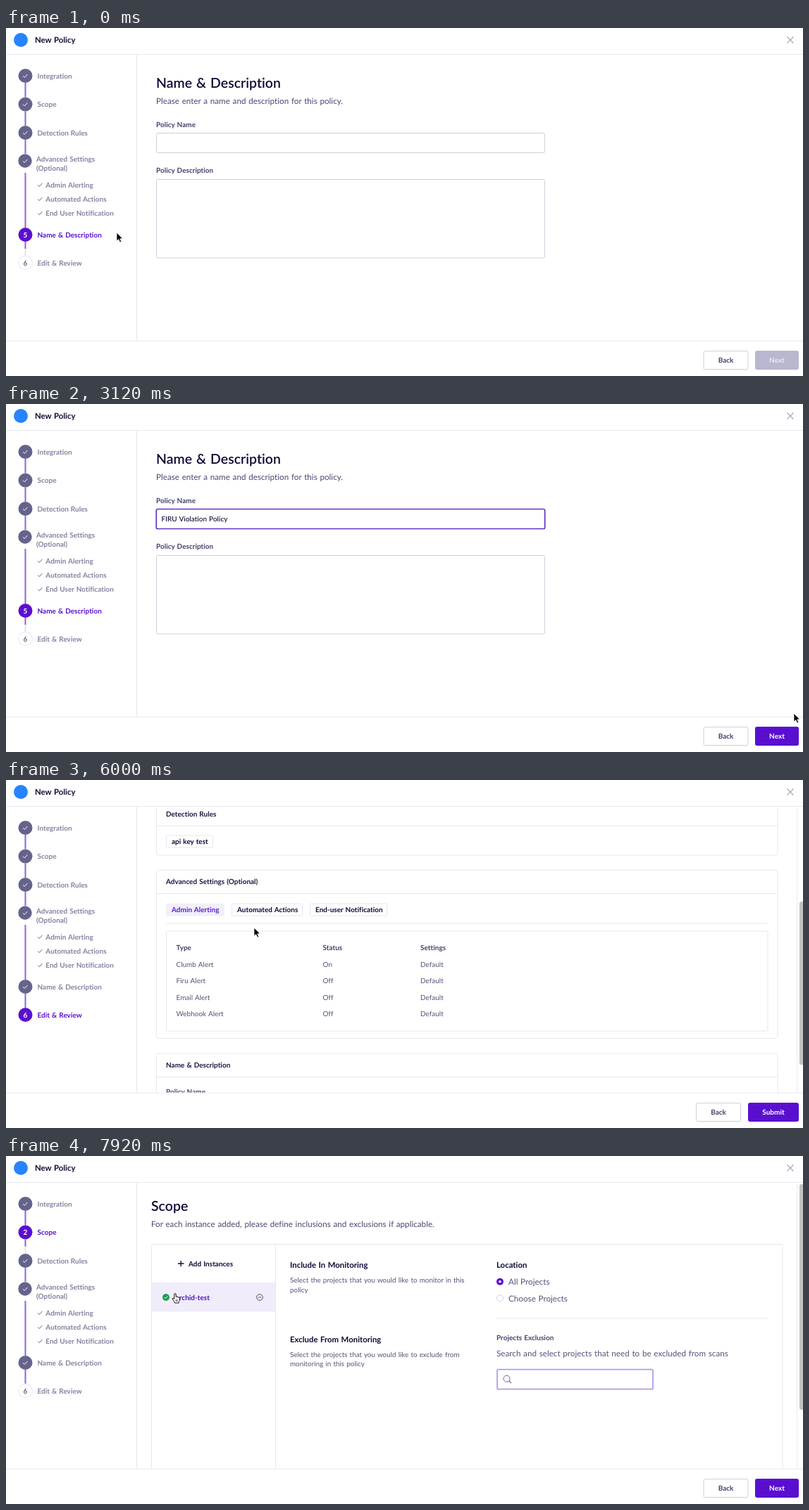
These frames come from a looping animation (1131 px wide and 495 px high, 8000 ms). An HTML page:

```html
<!DOCTYPE html>
<html lang="en">
<head>
<meta charset="utf-8">
<title>New Policy</title>
<style>
html, body { margin: 0; width: 100%; height: 100%; overflow: hidden; background: #fff; }
svg { display: block; }
text {
  font-family: Lato, "Open Sans", sans-serif; font-variant-ligatures: none;
  word-spacing: .06em; white-space: pre; text-rendering: geometricPrecision;
}
</style>
</head>
<body>
<svg id="stage" width="1131" height="495" viewBox="0 0 1131 495"></svg>
<script>
const LOOP = 8000, STEP = 80;
const INK = '#100b35', LABEL = '#45426b', BODY = '#56537a', MUTED = '#85829f';
const PURPLE = '#5a0fd0', DONE = '#65638b', RULE = '#e7e6ef', EDGE = '#cfcedb';
const NAME = 'FIRU Violation Policy', SITE = 'orchid-test';

// Drawing helpers; text y is the middle of the capitals.
const text = (x, y, s, fill = INK, size = 10, weight = 700, anchor = 'start', id = '') =>
  `<text ${id && `id="${id}"`} x="${x}" y="${y + size * .36}" fill="${fill}" font-size="${size}" font-weight="${weight}" text-anchor="${anchor}">${s.replace('&', '&amp;')}</text>`;
const plain = (x, y, s, size = 10, fill = BODY) => text(x, y, s, fill, size, 400);
const rect = (x, y, x2, y2, stroke = RULE, fill = 'none', width = 1, rx = 2) =>
  `<rect x="${x}" y="${y}" width="${x2 - x}" height="${y2 - y}" rx="${rx}" fill="${fill}" stroke="${stroke}" stroke-width="${width}"/>`;
const path = (d, stroke = RULE, width = 1, fill = 'none') =>
  `<path d="${d}" fill="${fill}" stroke="${stroke}" stroke-width="${width}"/>`;
const dot = (x, y, r, fill, stroke = 'none') =>
  `<circle cx="${x}" cy="${y}" r="${r}" fill="${fill}" stroke="${stroke}"/>`;
const group = (id, body) => `<g id="${id}">${body}</g>`;
const tick = (x, y, color, s = 1) =>
  path(`M${x - 3.2 * s} ${y + .2 * s}l${2.2 * s} ${2.2 * s}l${4.2 * s} ${-4.6 * s}`, color, 1);

const heading = (x, y, title, note) =>
  text(x, y, title, INK, 19.5, 600) + plain(x, y + 26, note, 11.7, '#4b4870');

const button = (x, x2, label, fill, color, stroke = fill) =>
  rect(x + .5, 459.5, x2 - .5, 485.5, stroke, fill) + text((x + x2) / 2, 472, label, color, 10, 700, 'middle');
const back = x => button(x, x + 64, 'Back', '#fff', LABEL, EDGE);

function sidebar(active, doneCount) {
  const steps = [[68, 'Integration'], [108.5, 'Scope'], [149, 'Detection Rules'], [189, ''],
    [294, 'Name & Description'], [334, 'Edit & Review']];
  let out = '';
  steps.forEach(([y, label], i) => {
    const n = i + 1, on = n === active, done = !on && n <= doneCount;
    if (n < 6) {
      const top = n === 4 ? 206 : y + 10, end = steps[i + 1][0] - 10;
      out += path(`M27.5 ${top}V${end}`, '#e6e4ee', 2);
      out += path(`M27.5 ${top}V${on ? (top + end) / 2 : end}`, '#9468da', 2);
    }
    out += dot(n === 4 ? 27 : 27.5, y, n === 4 ? 9.7 : 10, on ? PURPLE : done ? DONE : '#fff', on || done ? 'none' : RULE);
    out += done ? tick(27.3, y, '#fff')
      : text(27.5, y, String(n), on ? '#fff' : DONE, 10, 700, 'middle');
    out += text(44.5, y, label, on ? PURPLE : MUTED);
  });
  out += text(43, 186, 'Advanced Settings', MUTED) + text(43, 199.5, '(Optional)', MUTED);
  ['Admin Alerting', 'Automated Actions', 'End User Notification'].forEach((s, i) => {
    const y = 223 + i * 20.2;
    out += tick(48.3, y, DONE) + text(56.3, y, s, MUTED);
  });
  return out;
}

const card = (y, y2, title) => rect(213.5, y, 1095, y2, RULE, '#fff', 1, 3) +
  path(`M213.5 ${y + 33.5}H1095`) + text(227, y + 16.5, title, '#1b1642');
const tag = (x, x2, y, s, on) =>
  rect(x + .5, y - 8.5, x2 - .5, y + 8.5, on ? '#f1eff8' : RULE, on ? '#f1eff8' : '#fff', 1, 1) +
  text(x + 8, y, s, on ? '#5a1fd0' : INK);
const scrollbar = (len, id) => path('M1122.5 38V445', '#ececf0') +
  `<rect id="${id}" x="1126" y="40" width="8" height="${len}" rx="3" fill="#c1c1c1"/>`;
const view = body =>
  `<svg x="0" y="38.5" width="1131" height="406" viewBox="0 38.5 1131 406">${body}</svg>`;

function formPage() {
  return sidebar(5, 4) +
    heading(213, 78, 'Name & Description', 'Please enter a name and description for this policy.') +
    text(213, 137, 'Policy Name', LABEL) + rect(213.5, 149.5, 764.5, 177.5, EDGE) +
    group('focus', rect(213.3, 149.5, 764.7, 177.5, '#6530c4', 'none', 1.7)) +
    text(220.5, 163.5, '', INK, 10, 500, 'start', 'typed') +
    `<path id="caret" d="M0 157V170" stroke="#111"/>` +
    text(213, 202.5, 'Policy Description', LABEL) + rect(213.5, 215.5, 764.5, 327, EDGE) +
    back(989.5) + button(1063, 1125, 'Next', '#b9b6cf', '#ebeaf3') +
    group('ready', button(1063, 1125, 'Next', PURPLE, '#fff'));
}

function reviewPage() {
  const cols = [227, 442.5, 586], cells = [241.5, 449.5, 588];
  const row = (xs, y, items, bold) => items.map((s, i) =>
    bold ? text(xs[i], y, s, LABEL) : plain(xs[i], y, s)).join('');
  const body =
    heading(213, 78, 'Edit & Review', 'Please edit and review all policy settings before continuing.') +
    card(132.5, 237.5, 'Scope') +
    row(cols, 190, ['Site', 'Project Inclusions', 'Project Exclusion'], true) +
    row(cols, 213.5, [SITE, 'All Projects', 'N/A']) +
    card(259, 334.5, 'Detection Rules') + tag(227, 294, 315, 'api key test') +
    card(355.5, 595, 'Advanced Settings (Optional)') +
    tag(227, 310, 412, 'Admin Alerting', true) + tag(320, 421, 412, 'Automated Actions') +
    tag(431, 541, 412, 'End-user Notification') +
    path('M227 431.5H1081') + rect(227.5, 442.5, 1081, 584.5) +
    row(cells, 466, ['Type', 'Status', 'Settings'], true) +
    ['Clumb', 'Firu', 'Email', 'Webhook'].map((s, i) =>
      row(cells, 489.5 + i * 23.6, [s + ' Alert', i ? 'Off' : 'On', 'Default'])).join('') +
    card(616.5, 722, 'Name & Description') +
    text(227, 670.5, 'Policy Name', LABEL) + plain(227, 694, NAME);
  return sidebar(6, 5) + view(group('scroll', body)) + scrollbar(232, 'thumb') +
    back(979) + button(1053, 1125, 'Submit', PURPLE, '#fff');
}

function scopePage() {
  const about = (y, title, a, b) => text(403, y, title, INK, 11.4) +
    plain(403, y + 21.5, a, 9.9) + plain(403, y + 35, b, 9.9);
  const body =
    heading(206, 71, 'Scope', 'For each instance added, please define inclusions and exclusions if applicable.') +
    rect(206.5, 125.5, 1102, 470) + path('M382.5 126V445') +
    path('M244 153H252.5M248.2 148.8V157.2', INK, 1.3) + text(259, 153, 'Add Instances') +
    '<rect x="207" y="180" width="175" height="41.5" fill="#f0ecfa"/>' +
    dot(227, 201, 5, '#1fa04a') + tick(227, 201, '#fff', .7) + text(240, 201, SITE, '#4c16b8') +
    dot(360, 201, 4.3, 'none', '#4a4770') + path('M358 201H362', '#4a4770') +
    about(155, 'Include In Monitoring', 'Select the projects that you would like to monitor in this', 'policy') +
    about(260.5, 'Exclude From Monitoring', 'Select the projects that you would like to exclude from', 'monitoring in this policy') +
    text(696, 155, 'Location', INK, 11.4) +
    dot(701, 178.7, 5, PURPLE) + dot(701, 178.7, 1.8, '#fff') + plain(713, 178.7, 'All Projects', 11.7) +
    dot(701, 202.3, 4.6, '#fff', EDGE) + plain(713, 202.3, 'Choose Projects', 11.7) +
    path('M696 231H1081') + text(696, 258, 'Projects Exclusion', LABEL) +
    plain(696, 280.5, 'Search and select projects that need to be excluded from scans', 11.7) +
    rect(697, 303.7, 918, 331.7, '#b497ea', '#fff', 1.7) +
    dot(710.5, 316.7, 4.5, 'none', DONE) + path('M713.8 320L717 323', DONE, 1.2);
  return sidebar(2, 5) + view(body) + scrollbar(321, 'thumb2') +
    back(989.5) + button(1063, 1125, 'Next', PURPLE, '#fff');
}

const cursors =
  group('arrow', path('M0 0V12L2.8 9.5L4.7 13.8L6.7 12.9L4.9 8.7H8.6Z', '#fff', .8, '#000')) +
  group('beam', path('M-3 -6Q0 -6 0 -4.5V4.5Q0 6 -3 6M3 -6Q0 -6 0 -4.5V4.5Q0 6 3 6M-1.6 1.5H1.6', '#111', 1.3)) +
  group('hand', path('M-1.2 6V1Q-1.2 -.4 0 -.4T1.2 1V4.2Q2.3 3.5 3 4.6Q4.2 4 4.8 5.2Q6.6 4.8 6.6 6.8Q6.6 10 5.2 11.5V13H-.4Q-1 10.8 -3.6 8Q-4.4 6.6 -3.2 6.2Q-2.2 6 -1.2 7.5Z', '#111', 1, '#fff') +
    path('M1.3 8V11M3 8V11', '#111', .7));

document.getElementById('stage').innerHTML =
  dot(21, 17, 10, '#2684ff') + text(41, 17, 'New Policy', INK, 11.4) +
  path('M1108.5 12.5L1117.5 21.5M1117.5 12.5L1108.5 21.5', '#a9a8bd', 1.3) +
  path('M0 37.5H1131M185.5 38V445M0 445H1131') +
  group('page0', formPage()) + group('page1', reviewPage()) + group('page2', scopePage()) +
  group('cursor', cursors);

const CURSOR = [[0, 157, 291], [320, 290, 304], [560, 371, 296], [720, 340, 262], [880, 255, 215],
  [1120, 243.5, 160], [2720, 243.5, 160], [2960, 740, 310], [3120, 1118, 440], [3360, 1096, 470],
  [3760, 1096, 470], [4080, 640, 290], [4400, 185, 79], [4720, 215, 140], [5120, 330, 200],
  [5440, 352, 210], [6480, 352, 210], [6800, 286, 112], [7120, 58, 106], [7360, 58, 106], [7920, 240, 196]];
const SCROLL = [[5520, 0], [5760, 95], [6000, 227.5], [6160, 282], [6320, 291], [6480, 280], [6800, 132.5], [7040, 10], [7120, 0]];

function track(keys, t) {
  const i = keys.findIndex(k => k[0] > t);
  if (i === 0) return keys[0].slice(1);
  if (i < 0) return keys[keys.length - 1].slice(1);
  const a = keys[i - 1], b = keys[i], p = (t - a[0]) / (b[0] - a[0]);
  return a.slice(1).map((v, j) => v + (b[j + 1] - v) * p);
}

const el = id => document.getElementById(id);
const show = (id, on) => el(id).style.display = on ? '' : 'none';
const within = (v, lo, hi) => v >= lo && v < hi;

function pointer(page, x, y) {
  if (y > 459 && x > 979) return 'hand';
  if (page === 0 && within(x, 213, 765) && (within(y, 149, 178) || within(y, 215, 327))) return 'beam';
  if (page === 1 && x < 140 && within(y, 58, 344)) return 'hand';
  if (page === 2 && (x < 100 && y < 118 || within(x, 207, 382) && within(y, 180, 222))) return 'hand';
  return 'arrow';
}

function draw(t) {
  const page = t < 3680 ? 0 : t < 7360 ? 1 : 2;
  for (let i = 0; i < 3; i++) show('page' + i, i === page);

  const count = Math.max(0, Math.min(NAME.length, Math.ceil((t - 1920) / 800 * NAME.length)));
  el('typed').textContent = NAME.slice(0, count);
  show('focus', t >= 1280);
  show('ready', count > 0);
  const caret = within(t, 1280, 1600) || within(t, 1840, 3040);
  show('caret', caret && page === 0);
  if (page === 0) {
    const end = count ? el('typed').getComputedTextLength() : 0;
    el('caret').setAttribute('transform', `translate(${221 + end} 0)`);
  }

  const [top] = track(SCROLL, t);
  el('scroll').setAttribute('transform', `translate(0 ${-top})`);
  el('thumb').setAttribute('y', 40 + top * .585);

  const [x, y] = track(CURSOR, t), kind = pointer(page, x, y);
  for (const k of ['arrow', 'beam', 'hand']) show(k, k === kind);
  show('cursor', !within(t, 2000, 2720));
  el('cursor').setAttribute('transform', `translate(${x} ${y})`);
}

const start = performance.now();
function tickFrame() {
  const t = (performance.now() - start) % LOOP;
  draw(Math.floor(t / STEP) * STEP);
  requestAnimationFrame(tickFrame);
}
tickFrame();
</script>
</body>
</html>
```
